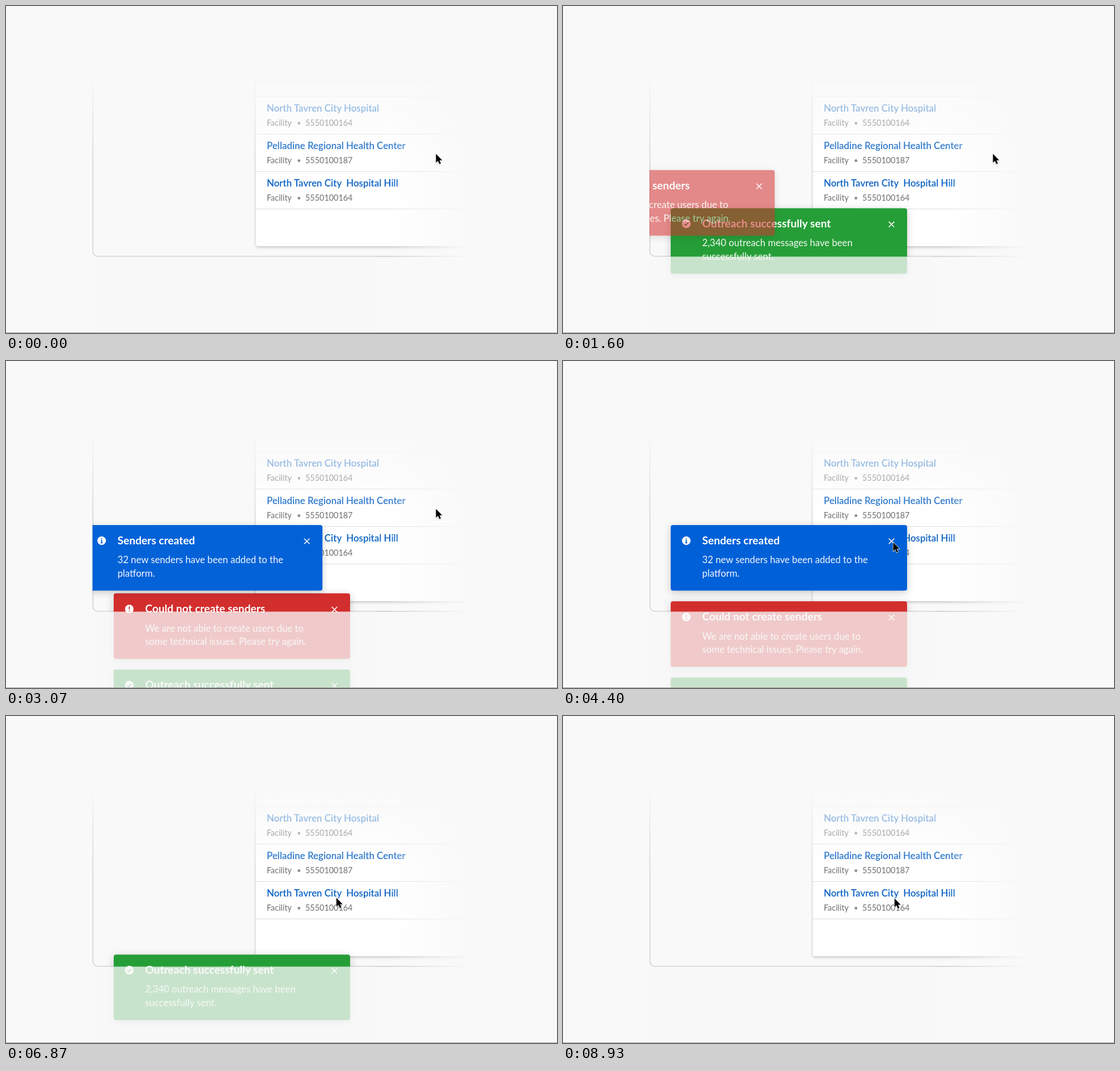
Recreate the animation shown at these times as an HTML page. Size 972x576 px, loop 8990 ms.

```html
<!DOCTYPE html>
<html lang="en">
<head>
<meta charset="utf-8">
<title>Stacked notifications</title>
<style>
  html, body { margin: 0; width: 100%; height: 100%; overflow: hidden; background: #f9f9f9; }
  svg { display: block; width: 100%; height: 100%; }
  text { font-family: Lato, "Open Sans", sans-serif; white-space: pre; }
  .name { font-size: 16.9px; font-weight: 600; fill: #0a62c4; }
  .meta { font-size: 14.4px; fill: #707070; }
  .title { font-size: 19.15px; font-weight: 700; fill: #fff; }
  .body { font-size: 16.7px; fill: #fff; fill-opacity: .95; }
</style>
</head>
<body>
<svg viewBox="0 0 972 576">
  <defs>
    <linearGradient id="fadeTop" x1="0" y1="120" x2="0" y2="270" gradientUnits="userSpaceOnUse">
      <stop stop-color="#f9f9f9"/>
      <stop offset="1" stop-color="#f9f9f9" stop-opacity="0"/>
    </linearGradient>
    <linearGradient id="fadeRight" x1="675" y1="0" x2="820" y2="0" gradientUnits="userSpaceOnUse">
      <stop stop-color="#f9f9f9" stop-opacity="0"/>
      <stop offset="1" stop-color="#f9f9f9"/>
    </linearGradient>
    <filter id="panelShadow" x="-10%" y="-10%" width="120%" height="120%">
      <feDropShadow dx="0" dy="2" stdDeviation="2.5" flood-opacity=".22"/>
    </filter>
    <filter id="toastShadow" x="-10%" y="-30%" width="120%" height="160%">
      <feDropShadow dx="0" dy="3" stdDeviation="7" flood-opacity=".2"/>
    </filter>
    <filter id="cursorShadow" x="-50%" y="-50%" width="200%" height="200%">
      <feDropShadow dx="0" dy="1" stdDeviation="1" flood-opacity=".25"/>
    </filter>
    <clipPath id="stageClip"><path d="M152.5 0H972V576H152.5z"/></clipPath>
  </defs>

  <rect width="972" height="576" fill="#f9f9f9"/>
  <path d="M153.3 110V432a9 9 0 0 0 9 9H830" fill="none" stroke="#cdcdcd" stroke-width="1.3"/>
  <path d="M441 90H830V423H445a4 4 0 0 1-4-4z" fill="#fff" filter="url(#panelShadow)"/>
  <g id="rows"></g>
  <rect x="140" y="70" width="720" height="200" fill="url(#fadeTop)"/>
  <rect x="675" y="70" width="200" height="400" fill="url(#fadeRight)"/>
  <path d="M441 133H805" stroke="#f4f4f4"/>

  <g id="toasts" clip-path="url(#stageClip)"></g>
  <rect x="152" y="441.5" width="500" height="134" fill="#f9f9f9" opacity=".77"/>
  <path d="M0 575.5H972" stroke="#a0a0a0"/>
  <g id="cursor">
    <path d="M0 0V16.5L3.8 13 6.3 19 9.2 17.8 6.7 12H11.7z" transform="scale(.94)" fill="#000"
      stroke="#fff" stroke-width="1.4" paint-order="stroke" filter="url(#cursorShadow)"/>
  </g>
</svg>
<script>
const LOOP = 8990, LEFT = 190, TOP = 289, PITCH = 134.3, SLIDE = 467;
const ENTER = 300, LEAVE = 55, SHIFT = 200;

const byId = id => document.getElementById(id);
const clamp = v => Math.min(1, Math.max(0, v));
const ease = v => v < .5 ? 4 * v ** 3 : 1 - 4 * (1 - v) ** 3;
const ramp = (t, from, span) => clamp((t - from) / span);

byId('rows').innerHTML = [
  ['North Tavren City Hospital', '5550100164'],
  ['Pelladine Regional Health Center', '5550100187'],
  ['North Tavren City  Hospital Hill', '5550100164']
].map(([name, code], i) => `<g transform="translate(441 ${159.5 + i * 66})">
  <path d="M0 0H389M0 66H389" stroke="#dedede"/>
  <text class="name" x="19" y="26.5">${name}</text>
  <text class="meta" x="19" y="51.5">Facility</text>
  <circle cx="75.8" cy="47" r="2.4" fill="#8c8c8c"/>
  <text class="meta" x="87" y="51.5">${code}</text>
</g>`).join('');

// Oldest first; each newer toast pushes the older ones down a slot.
const toasts = [
  { color: '#289e38', enter: 200, leave: 7955, title: 'Outreach successfully sent',
    lines: ['2,340 outreach messages have been', 'successfully sent.'],
    glyph: 'M-3.6 .2L-1.1 2.7 3.7-2.3' },
  { color: '#d32f2f', enter: 1451, leave: 6780, title: 'Could not create senders',
    lines: ['We are not able to create users due to', 'some technical issues. Please try again.'],
    glyph: 'M0-4.4V.9M0 3V4.6' },
  { color: '#0061d8', enter: 2860, leave: 5607, title: 'Senders created',
    lines: ['32 new senders have been added to the', 'platform.'],
    glyph: 'M0-4.6V-3M-1.4-.9H0V3.8M-1.8 3.8H1.8' }
];

byId('toasts').innerHTML = toasts.map(({ color, title, lines, glyph }) => `<g>
  <rect width="417" height="115.5" rx="4" fill="${color}" filter="url(#toastShadow)"/>
  <circle cx="27.5" cy="27.5" r="7.6" fill="#fff"/>
  <path d="${glyph}" transform="translate(27.5 27.5)" fill="none" stroke="${color}" stroke-width="1.8"/>
  <text class="title" x="55.5" y="33.5">${title}</text>
  ${lines.map((s, i) => `<text class="body" x="55.5" y="${67.3 + i * 23.3}">${s}</text>`).join('')}
  <path d="M384.7 23.7l9.6 9.6m0-9.6l-9.6 9.6" stroke="#fff" stroke-width="1.6"/>
</g>`).join('');
const nodes = [...byId('toasts').children];

// time, x, y of the pointer tip
const path = [
  [3880, 758.5, 260.5], [4330, 582.5, 319.5], [5600, 582.5, 319.5], [5750, 581.8, 319.3],
  [6600, 581.8, 319.3], [6840, 582.8, 320.3], [8450, 582.8, 320.3], [8700, 584.8, 321.3]
];

function pointer(t) {
  let [, x, y] = path[0];
  for (let i = 1; i < path.length; i++) {
    const [start] = path[i - 1], [end, px, py] = path[i];
    const p = ease(ramp(t, start, end - start));
    x += (px - x) * p;
    y += (py - y) * p;
  }
  return [x, y];
}

function draw(t) {
  let slot = 0;
  for (let i = toasts.length - 1; i >= 0; i--) {
    const { enter, leave } = toasts[i];
    const shown = ease(ramp(t, enter, ENTER));
    const gone = ramp(t, leave, LEAVE);
    const x = LEFT - SLIDE * (1 - shown + gone);
    const node = nodes[i];
    node.setAttribute('transform', `translate(${x} ${TOP + slot * PITCH})`);
    node.setAttribute('opacity', Math.min(1, shown * 1.1) * (1 - gone));
    slot += shown - ease(ramp(t, leave + LEAVE, SHIFT));
  }
  byId('cursor').setAttribute('transform', `translate(${pointer(t)})`);
}

function tick() {
  draw(performance.now() % LOOP);
  requestAnimationFrame(tick);
}
tick();
</script>
</body>
</html>
```
